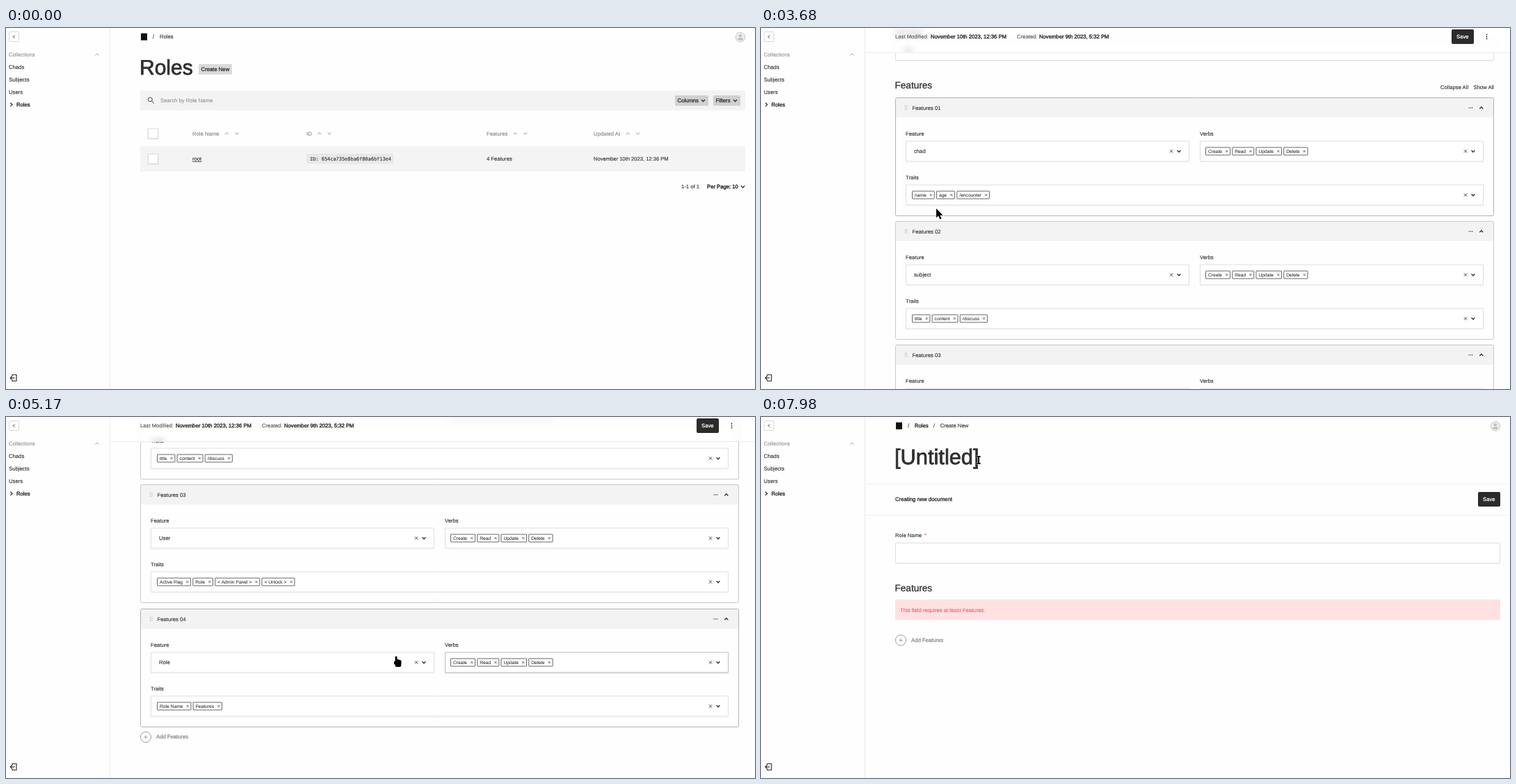
These frames come from a looping animation (1077 by 520 pixels, 8 s). An HTML page with a canvas:

```html
<!DOCTYPE html>
<html lang="en">
<head>
<meta charset="utf-8">
<title>Roles admin</title>
<style>
html, body { margin: 0; width: 100%; height: 100%; overflow: hidden; background: #fefefe; }
canvas { display: block; }
</style>
</head>
<body>
<canvas id="stage" width="1077" height="520"></canvas>
<script>
const W = 1077, H = 520, LOOP = 8000;
const canvas = document.getElementById('stage');
const ctx = canvas.getContext('2d');
const copy = document.createElement('canvas');
copy.width = W; copy.height = 60;
const copyCtx = copy.getContext('2d');

const SANS = '"Liberation Sans", Arial, sans-serif';
const MONO = '"DejaVu Sans Mono", monospace';
const PAPER = '#fefefe', INK = '#2f2f2f', GRAY = '#929292', PALE = '#f3f3f3', LINE = '#ebebeb';
const LEFT = 193, RIGHT = 1063, DOC_RIGHT = 1054;

const DOC_AT = 2150, LIST_AT = 6610, CREATE_AT = 7890;
const SCROLL_AT = 3261, SCROLL_TIME = 1122, SCROLL_END = 522.6;
const CARD_TOP = 264, CARD_PITCH = 178.2, CARD_H = 171;

// The pointer rests between glides: start, end, x, y
const ENTRY = [975, 508];
const GLIDES = [
  [210, 700, 223, 177], [700, 980, 275, 188], [2180, 2580, 262, 185],
  [2840, 3150, 172, 228], [3150, 3680, 252, 260], [3680, 4228, 556, 268],
  [4500, 4900, 836, 369], [4900, 5110, 561, 345], [5310, 6080, 30, 111],
  [6810, 7570, 296, 70], [7640, 7900, 313, 62]
];
const CLICKS = [[1250, 60], [1910, 140], [6410, 50], [7710, 180]];

const VERBS = ['Create', 'Read', 'Update', 'Delete'];
const CARDS = [
  ['chad', ['name', 'age', '/encounter']],
  ['subject', ['title', 'content', '/discuss']],
  ['User', ['Active Flag', 'Role', '< Admin Panel >', '< Unlock >']],
  ['Role', ['Role Name', 'Features']]
];

const clamp = v => Math.min(1, Math.max(0, v));
const smooth = u => u * u * (3 - 2 * u);
const inside = (p, x, y, w, h) => p[0] >= x && p[0] <= x + w && p[1] >= y && p[1] <= y + h;

// Motion advances in steps, as in a screen recording
function stepped(t) {
  const step = 68.6, phase = 3680;
  return phase + step * Math.floor((t - phase) / step + 0.1);
}

function pointerAt(t) {
  let [x, y] = ENTRY;
  for (const [start, end, toX, toY] of GLIDES) {
    const k = Math.sin(clamp((t - start) / (end - start)) * Math.PI / 2);
    x += (toX - x) * k;
    y += (toY - y) * k;
  }
  return [x, y];
}

const scrollAt = t => SCROLL_END * smooth(clamp((t - SCROLL_AT) / SCROLL_TIME));

function text(s, x, y, { color = INK, size = 7.7, bold = 0.12, font = SANS } = {}) {
  ctx.font = `${size}px ${font}`;
  ctx.fillStyle = ctx.strokeStyle = color;
  ctx.lineWidth = bold;
  ctx.lineJoin = 'round';
  const base = y + size * 0.36;
  ctx.fillText(s, x, base);
  ctx.strokeText(s, x, base);
  return ctx.measureText(s).width;
}

function fillBox(x, y, w, h, color, r = 0) {
  ctx.fillStyle = color;
  ctx.beginPath();
  ctx.roundRect(x, y, w, h, r);
  ctx.fill();
}

function frameBox(x, y, w, h, color, r = 0, lw = 1) {
  ctx.strokeStyle = color;
  ctx.lineWidth = lw;
  ctx.beginPath();
  ctx.roundRect(x + 0.5, y + 0.5, w - 1, h - 1, r);
  ctx.stroke();
}

function stroke(points, color = INK, lw = 1) {
  ctx.strokeStyle = color;
  ctx.lineWidth = lw;
  ctx.lineJoin = 'miter';
  ctx.beginPath();
  points.forEach(([x, y]) => ctx.lineTo(x, y));
  ctx.stroke();
}

function disc(x, y, r, color) {
  ctx.fillStyle = color;
  ctx.beginPath();
  ctx.arc(x, y, r, 0, 7);
  ctx.fill();
}

function ring(x, y, r, color) {
  ctx.strokeStyle = color;
  ctx.lineWidth = 0.9;
  ctx.beginPath();
  ctx.arc(x, y, r, 0, 7);
  ctx.stroke();
}

// dir: 1 points down, -1 points up
function chevron(x, y, dir, color = INK, lw = 1.3, r = 2.6) {
  const d = dir * r / 2;
  stroke([[x - r, y - d], [x, y + d], [x + r, y - d]], color, lw);
}

function sideChevron(x, y, dir, r, lw) {
  const d = dir * r / 2;
  stroke([[x - d, y - r], [x + d, y], [x - d, y + r]], INK, lw);
}

function cross(x, y, r, lw = 0.9) {
  for (const d of [-r, r]) stroke([[x - r, y - d], [x + r, y + d]], INK, lw);
}

function field(x, y, w, hover) {
  fillBox(x, y + 1, w, 30, hover ? '#d6d6d6' : '#f4f4f4');
  fillBox(x, y, w, 30, '#fff');
  frameBox(x, y, w, 30, hover ? '#bcbcbc' : '#dedede');
}

function sidebar(hoverRoles) {
  fillBox(149, 0, 1, H, LINE);
  frameBox(4, 5, 15, 15, '#d8d8d8', 1);
  sideChevron(11.3, 12.5, -1, 2.1, 1);
  text('Collections', 4, 38.5, { color: GRAY });
  chevron(131, 38.3, -1, '#a0a0a0', 0.9);
  ['Chads', 'Subjects', 'Users'].forEach((s, i) => text(s, 4, 56 + i * 18.1));
  sideChevron(7.7, 110.3, 1, 2.6, 1.3);
  const w = text('Roles', 15, 110.5, { bold: 0.4 });
  if (hoverRoles) fillBox(15, 114, w, 0.9, INK);
  stroke([[9, 501.5], [9, 499.5], [15, 499.5], [15, 508.5], [9, 508.5], [9, 506.5]], INK, 1.2);
  stroke([[12.5, 504], [6, 504]], INK, 1.2);
  sideChevron(7.4, 504, -1, 2.5, 1.2);
}

function topBar(y, trail) {
  fillBox(194, y - 5, 9, 10, '#111');
  let x = 211;
  trail.forEach((s, i) => {
    text('/', x, y);
    const last = i === trail.length - 1;
    x += 10 + text(s, x + 10, y, { bold: last ? 0.12 : 0.4 }) + 7;
  });
  disc(1056, y + 0.5, 7, '#ececec');
  ring(1056, y + 0.5, 6.8, '#c8c8c8');
  disc(1056, y - 1.5, 2.1, '#bdbdbd');
  fillBox(1052.3, y + 1.6, 7.4, 3.2, '#bdbdbd', 1.6);
}

const title = (s, size = 30, y = 56.5) => text(s, 192, y, { size, bold: 0.8 });

function button(x, y, w, label, fill) {
  fillBox(x, y, w, 15, fill, 1);
  text(label, x + 3.6, y + 7.5, { bold: 0.3 });
}

function dropButton(x, w, label) {
  button(x, 97, w, label, '#d0d0d0');
  chevron(x + w - 7.5, 104.5, 1);
}

function checkbox(y) {
  fillBox(203.5, y, 16, 16, '#e2e2e2', 1);
  fillBox(204, y, 14.5, 14.5, '#fff');
  frameBox(204, y, 15, 15, '#dcdcdc');
}

function column(label, x) {
  const cx = x + 11 + text(label, x, 152, { color: '#858585' });
  chevron(cx, 152, -1, GRAY, 1);
  chevron(cx + 14.4, 152, 1, GRAY, 1);
}

function table() {
  checkbox(144.5);
  column('Role Name', 268);
  column('ID', 432);
  column('Features', 691);
  column('Updated At', 845);
  fillBox(LEFT, 170, RIGHT - LEFT, 37, '#f4f4f4');
  checkbox(181);
  const w = text('root', 268, 188.5);
  fillBox(268, 192, w, 0.8, INK);
  fillBox(432, 181, 125, 14.5, '#e8e8e8', 1);
  text('ID: 654ca735e8ba6f80a6bf13e4', 437, 188.6, { size: 6.95, font: MONO });
  text('4 Features', 691, 188.5);
  text('November 10th 2023, 12:36 PM', 845, 188.5, { size: 7.6 });
  text('1-1 of 1', 971, 228.5);
  text('Per Page: 10', 1008, 228.5, { bold: 0.45 });
  chevron(1059.5, 228.5, 1);
}

function listPage(loaded) {
  topBar(12.7, ['Roles']);
  title('Roles');
  button(277, 52, 48, 'Create New', '#dadada');
  fillBox(LEFT, 90, RIGHT - LEFT, 28.5, PALE);
  ring(207.3, 103, 3, INK);
  stroke([[209.5, 105.2], [213, 108.6]]);
  text('Search by Role Name', 222, 104.5, { color: GRAY });
  dropButton(962, 48, 'Columns');
  dropButton(1017, 39, 'Filters');
  if (loaded) table();
}

function saveButton(x, y) {
  fillBox(x, y - 10.5, 32, 21, '#2b2b2b', 2);
  text('Save', x + 7, y + 0.2, { color: '#fff', bold: 0.25 });
}

function roleName(y, right, value) {
  const w = text('Role Name', LEFT, y, { size: 7.6 });
  text('*', LEFT + w + 4, y + 0.5, { color: '#f0606a' });
  field(LEFT, y + 11, right - LEFT, false);
  text(value, 205, y + 25.5);
}

const heading = y => text('Features', 192.5, y, { size: 13.6, bold: 0.3 });

function addRow(y) {
  ring(201, y, 7.6, GRAY);
  stroke([[198.5, y], [203.5, y]], GRAY, 0.9);
  stroke([[201, y - 2.5], [201, y + 2.5]], GRAY, 0.9);
  text('Add Features', 216, y - 0.3, { color: GRAY, bold: 0.35 });
}

function createPage() {
  topBar(12.7, ['Roles', 'Create New']);
  title('[Untitled]', 30.8);
  for (const y of [96, 141]) fillBox(150, y, W - 150, 1, '#efefef');
  text('Creating new document', LEFT, 118.7, { bold: 0.35, size: 7.75 });
  saveButton(1031, 118.5);
  roleName(170, RIGHT, '');
  heading(246);
  fillBox(LEFT, 263, RIGHT - LEFT, 29.5, '#ffe1e2');
  text('This field requires at least Features.', 200, 278, { color: '#f0606c' });
  addRow(321.5);
}

function tags(list, x, y) {
  for (const s of list) {
    const w = text(s, x + 4, y, { size: 6.7, bold: 0.05 }) + 16;
    frameBox(x, y - 6, w, 12, '#555', 0.5, 0.9);
    cross(x + w - 5.3, y, 1.6, 0.7);
    x += w + 2.2;
  }
}

function select(x, y, w, past) {
  field(x, y, w, inside(past, x, y, w, 30));
  cross(x + w - 26, y + 15, 2.1);
  chevron(x + w - 15, y + 15, 1, INK, 1.4, 2.4);
}

function card(i, y, p, past) {
  const [name, traits] = CARDS[i], w = DOC_RIGHT - LEFT;
  fillBox(LEFT, y, w, 29, PALE, 2);
  frameBox(LEFT, y, w, CARD_H, inside(p, LEFT, y, w, CARD_H) ? '#b2b2b2' : '#c8c8c8', 2);
  for (let k = 0; k < 6; k++) fillBox(207 + (k % 2) * 2.4, y + 12 + (k >> 1) * 2.3, 1, 1, '#a0a0a0');
  text('Features 0' + (i + 1), 217.5, y + 15);
  for (let k = -1; k < 2; k++) disc(1020.5 + k * 2.3, y + 15, 0.7, INK);
  chevron(1035.8, y + 15, -1, INK, 1.4, 2.5);
  text('Feature', 208, y + 52);
  text('Verbs', 631, y + 52);
  text('Traits', 208, y + 115);
  select(208, y + 62.5, 408, past);
  select(631, y + 62.5, 408, past);
  select(208, y + 125.5, 831, past);
  text(name, 220, y + 77.5);
  tags(VERBS, 639, y + 77.5);
  tags(traits, 217, y + 140.5);
}

// Blurs what lies under the fixed bar
function frost(bottom) {
  copyCtx.drawImage(canvas, 0, 0);
  ctx.save();
  ctx.beginPath();
  ctx.rect(150, 0, W - 150, bottom);
  ctx.clip();
  fillBox(150, 0, W - 150, bottom, PAPER);
  ctx.filter = 'blur(4px)';
  ctx.drawImage(copy, 0, 0);
  ctx.filter = 'none';
  fillBox(150, 0, W - 150, bottom, 'rgba(254,254,254,.45)');
  ctx.restore();
}

function docBar(y, stuck) {
  if (stuck) frost(y + 23.5);
  else fillBox(150, y - 22.5, W - 150, 1, '#efefef');
  fillBox(150, y + 22.5, W - 150, 1, LINE);
  text('Last Modified:', LEFT, y + 0.2, { color: '#555' });
  text('November 10th 2023, 12:36 PM', 244, y + 0.2, { bold: 0.4 });
  text('Created:', 368, y + 0.2, { color: '#555' });
  text('November 9th 2023, 5:32 PM', 400, y + 0.2, { bold: 0.4 });
  saveButton(993, y);
  for (let k = -1; k < 2; k++) disc(1043.5, y + k * 3, 0.9, INK);
}

function docPage(scroll, loaded, p, past) {
  ctx.save();
  ctx.translate(0, -Math.round(scroll));
  topBar(12.7, ['Roles', 'root']);
  title('root');
  roleName(170, DOC_RIGHT, 'root');
  if (loaded) {
    heading(246.5);
    text('Collapse All', 977, 249);
    text('Show All', 1024.5, 249);
    const local = q => [q[0], q[1] + scroll];
    CARDS.forEach((c, i) => card(i, Math.round(CARD_TOP + i * CARD_PITCH), local(p), local(past)));
    addRow(984);
  }
  ctx.restore();
  docBar(Math.max(12.5, 118.5 - scroll), scroll > 106);
}

function shape(points) {
  ctx.beginPath();
  points.forEach(([x, y]) => ctx.lineTo(x, y));
  ctx.closePath();
}

function outlined() {
  ctx.lineWidth = 1.6;
  ctx.strokeStyle = '#fff';
  ctx.stroke();
  ctx.fillStyle = '#000';
  ctx.fill();
}

function arrow() {
  shape([[0, 0], [0, 13.2], [3, 10.5], [5.2, 15.6], [7.6, 14.6], [5.5, 9.7], [9.6, 9.7]]);
  outlined();
}

function hand() {
  ctx.beginPath();
  ctx.roundRect(-1.5, -0.5, 3, 10, 1.5);
  for (let k = 0; k < 3; k++) ctx.roundRect(1 + k * 2, 4 + k * 0.6, 2.4, 7, 1.2);
  ctx.roundRect(-3, 6.5, 3, 5, 1.5);
  ctx.roundRect(-1.5, 7, 8.7, 8, 2.5);
  outlined();
}

function beam() {
  for (const [color, lw] of [['#fff', 3], ['#000', 1.8]]) {
    for (const y of [-5, 5]) stroke([[-2.6, y], [2.6, y]], color, lw);
    stroke([[0, -5], [0, 5]], color, lw);
  }
}

function pointer(t, p, page) {
  if (t < ENTRY_TIME) return;
  if (CLICKS.some(([start, hold]) => t >= start && t < start + hold)) {
    disc(p[0] + 0.5, p[1] + 0.5, 7.5, 'rgba(240,228,20,.78)');
  }
  let draw = arrow;
  if (page === 'doc') {
    if (t < SCROLL_AT && inside(p, LEFT, 181, 861, 29)) draw = beam;
    if (t > SCROLL_AT + SCROLL_TIME && inside(p, 208, 338, 831, 31)) draw = hand;
  }
  if (page === 'list' && inside(p, 277, 52, 48, 15)) draw = hand;
  if (page === 'create') draw = beam;
  if (overRoles(p)) draw = hand;
  ctx.save();
  ctx.translate(p[0], p[1]);
  draw();
  ctx.restore();
}

const ENTRY_TIME = GLIDES[0][0];
const overRoles = p => inside(p, 4, 104, 32, 13);

function render(t) {
  const m = stepped(t);
  const page = t < DOC_AT ? 'list' : t < LIST_AT ? 'doc' : t < CREATE_AT ? 'list' : 'create';
  const p = pointerAt(m);
  // Field hover fades late and not while scrolling
  const past = m < SCROLL_AT + SCROLL_TIME ? [0, 0] : pointerAt(m - 140);
  ctx.textRendering = 'geometricPrecision';
  fillBox(0, 0, W, H, PAPER);
  if (page === 'list') listPage(t < DOC_AT || t > LIST_AT + 260);
  else if (page === 'doc') docPage(scrollAt(m), t > DOC_AT + 70, p, past);
  else createPage();
  sidebar(overRoles(p));
  pointer(t, p, page);
}

let start = null;
function tick(now) {
  if (start === null) start = now;
  render((now - start) % LOOP);
  requestAnimationFrame(tick);
}
render(0);
requestAnimationFrame(tick);
</script>
</body>
</html>
```
